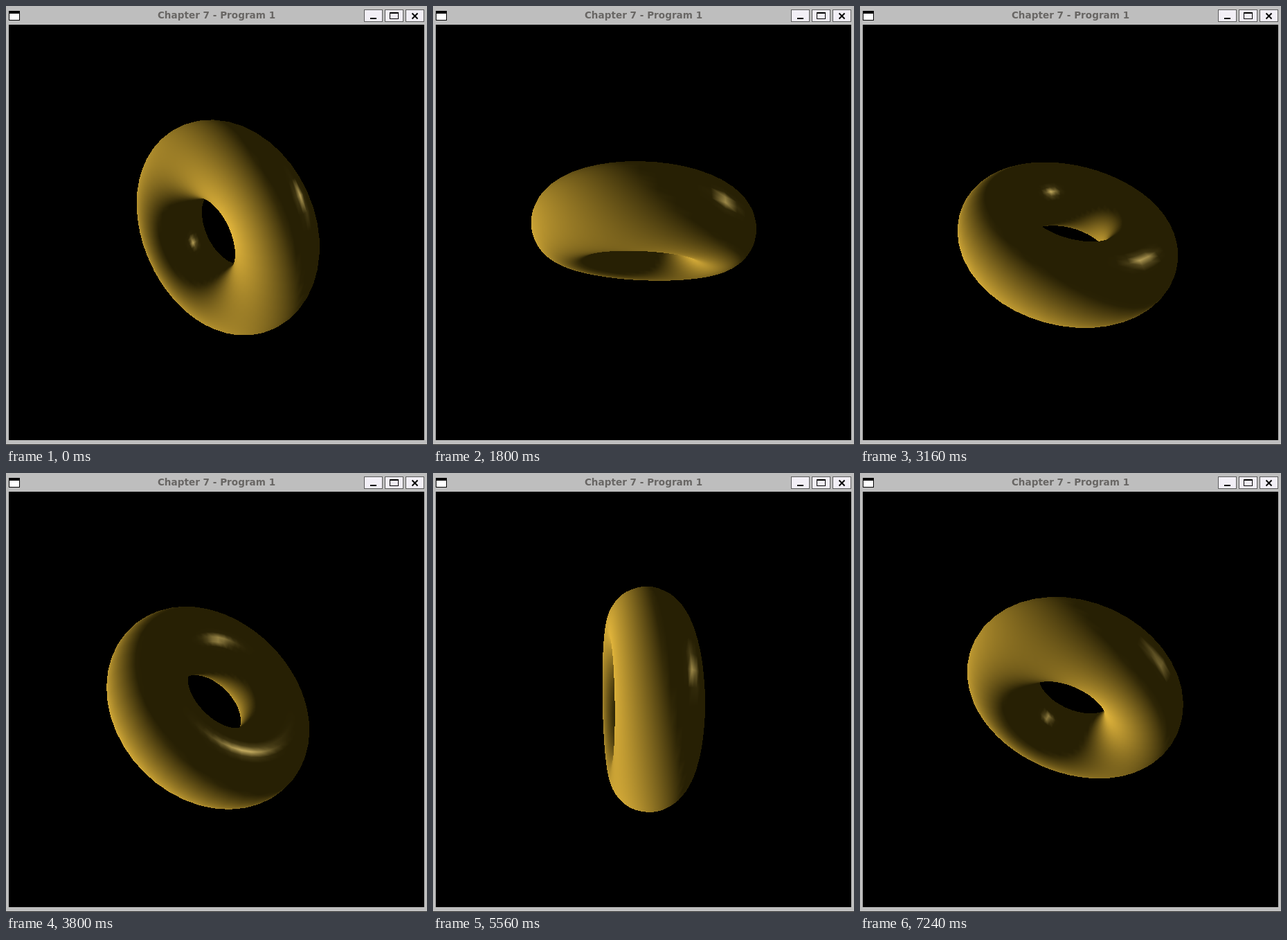
Animation, 608 px wide and 634 px high, one loop 7.28 s. Source, as an HTML page with a canvas:

```html
<!DOCTYPE html>
<html lang="en">
<head>
<meta charset="utf-8">
<title>Chapter 7 - Program 1</title>
<style>
  html, body { margin: 0; width: 100%; height: 100%; overflow: hidden; background: #bebebe; }
  .win { position: absolute; left: 0; top: 0; width: 608px; height: 634px; }
  canvas { position: absolute; left: 4px; top: 27px; background: #000; }
  .title { font: bold 13.6px "DejaVu Sans", sans-serif; fill: #686664; }
  .crisp { shape-rendering: crispEdges; }
</style>
</head>
<body>
<svg class="win" viewBox="0 0 608 634">
  <rect width="608" height="634" fill="#bebebe"/>
  <rect class="crisp" y="633" width="608" height="1" fill="#2c2c2c"/>
  <g class="crisp">
    <rect x="4" y="7" width="16" height="14" fill="#000"/>
    <rect x="5" y="11" width="14" height="9" fill="#fff"/>
  </g>
  <text class="title" x="304" y="18" text-anchor="middle">Chapter 7 - Program 1</text>
  <g class="crisp" fill="#f2eff6" stroke="#5c5c5c">
    <rect x="517.5" y="5.5" width="26" height="17"/>
    <rect x="547.5" y="5.5" width="26" height="17"/>
    <rect x="577.5" y="5.5" width="26" height="17"/>
  </g>
  <g class="crisp">
    <rect x="526" y="17" width="9" height="2"/>
    <path d="M554 9h13v10h-13zM555 11v7h11v-7z" fill-rule="evenodd"/>
  </g>
  <path d="M586.5 10.5l8 8m0-8l-8 8" stroke="#000" stroke-width="2"/>
</svg>
<canvas id="view" width="600" height="600"></canvas>
<script>
const SIZE = 600, SEG = 48, LOOP = 7280, STEP = 40;
const RING = 1, TUBE = 0.5, EYE = 5;
const FOCAL = SIZE / 2 / Math.tan(Math.PI / 6);
const LIGHT = [2.5, 1, 1];
const AMBIENT = [39, 32, 4], DIFFUSE = [190, 152, 57], SPECULAR = [160, 142, 93];
const SHININESS = 51.2;
// turn of the torus: [ms, degrees]
const TURN = [[0, 248.2], [1000, 289], [2560, 380.3], [3800, 450],
              [4560, 490.2], [5560, 554.8], [7240, 653]];

const ctx = document.getElementById('view').getContext('2d');
const image = ctx.createImageData(SIZE, SIZE);
const pixels = new Uint32Array(image.data.buffer);
const depth = new Float32Array(SIZE * SIZE);

const dot = (a, b) => a[0] * b[0] + a[1] * b[1] + a[2] * b[2];
const unit = v => { const n = Math.hypot(...v); return v.map(c => c / n); };

const mesh = [], faces = [];
for (let i = 0; i < SEG; i++) {
  for (let j = 0; j < SEG; j++) {
    const u = i / SEG * 2 * Math.PI, v = j / SEG * 2 * Math.PI;
    const normal = [Math.cos(v) * Math.cos(u), Math.sin(v), Math.cos(v) * Math.sin(u)];
    const pos = [RING * Math.cos(u) + TUBE * normal[0], TUBE * normal[1],
                 RING * Math.sin(u) + TUBE * normal[2]];
    mesh.push({ pos, normal });
    const id = (a, b) => (a % SEG) * SEG + b % SEG;
    const a = id(i, j), b = id(i + 1, j), c = id(i + 1, j + 1), d = id(i, j + 1);
    faces.push([a, b, c], [a, c, d]);
  }
}

function turnAt(t) {
  let k = 1;
  while (k < TURN.length - 1 && t > TURN[k][0]) k++;
  const [t0, a0] = TURN[k - 1], [t1, a1] = TURN[k];
  return (a0 + (a1 - a0) * (t - t0) / (t1 - t0)) * Math.PI / 180;
}

// rotation about the axis (1, 1, 0)
function rotate([x, y, z], cos, sin) {
  const h = Math.SQRT1_2, along = (x + y) / 2 * (1 - cos);
  return [x * cos + h * z * sin + along,
          y * cos - h * z * sin + along,
          z * cos + h * (y - x) * sin];
}

function shade(p, n) {
  const l = unit(LIGHT.map((c, i) => c - p[i]));
  const view = unit([-p[0], -p[1], EYE - p[2]]);
  const nl = dot(n, l);
  // diffuse falls on the side facing away from the light
  const diff = Math.max(0, -nl);
  const spec = Math.max(0, 2 * nl * dot(n, view) - dot(l, view)) ** SHININESS;
  return AMBIENT.map((c, i) => Math.min(255, c + DIFFUSE[i] * diff + SPECULAR[i] * spec));
}

function project({ pos, normal }, cos, sin) {
  const p = rotate(pos, cos, sin), w = 1 / (EYE - p[2]);
  return {
    x: SIZE / 2 + FOCAL * p[0] * w,
    y: SIZE / 2 - FOCAL * p[1] * w,
    w, rgb: shade(p, rotate(normal, cos, sin))
  };
}

function fillTriangle(a, b, c) {
  const area = (b.x - a.x) * (c.y - a.y) - (c.x - a.x) * (b.y - a.y);
  if (Math.abs(area) < 1e-6) return;
  const x0 = Math.ceil(Math.min(a.x, b.x, c.x) - 0.5), x1 = Math.max(a.x, b.x, c.x) - 0.5;
  const y0 = Math.ceil(Math.min(a.y, b.y, c.y) - 0.5), y1 = Math.max(a.y, b.y, c.y) - 0.5;
  for (let y = y0; y <= y1; y++) {
    for (let x = x0; x <= x1; x++) {
      const px = x + 0.5, py = y + 0.5;
      const s = ((px - a.x) * (c.y - a.y) - (c.x - a.x) * (py - a.y)) / area;
      const t = ((b.x - a.x) * (py - a.y) - (px - a.x) * (b.y - a.y)) / area;
      const r = 1 - s - t;
      if (s < -1e-9 || t < -1e-9 || r < -1e-9) continue;
      const w = r * a.w + s * b.w + t * c.w, i = y * SIZE + x;
      if (w <= depth[i]) continue;
      depth[i] = w;
      const mix = k => r * a.rgb[k] + s * b.rgb[k] + t * c.rgb[k] + 0.5 | 0;
      pixels[i] = 0xff000000 | mix(2) << 16 | mix(1) << 8 | mix(0);
    }
  }
}

function draw(t) {
  const turn = turnAt(t), cos = Math.cos(turn), sin = Math.sin(turn);
  const points = mesh.map(v => project(v, cos, sin));
  pixels.fill(0xff000000);
  depth.fill(0);
  for (const [a, b, c] of faces) fillTriangle(points[a], points[b], points[c]);
  ctx.putImageData(image, 0, 0);
}

let start = null, shown = -1;
function tick(now) {
  if (start === null) start = now;
  let step = Math.floor(Math.max(0, now - start) % LOOP / STEP);
  if (step === 65) step = 64; // one pose is held twice as long
  if (step !== shown) draw((shown = step) * STEP);
  requestAnimationFrame(tick);
}
draw(0);
requestAnimationFrame(tick);
</script>
</body>
</html>
```
